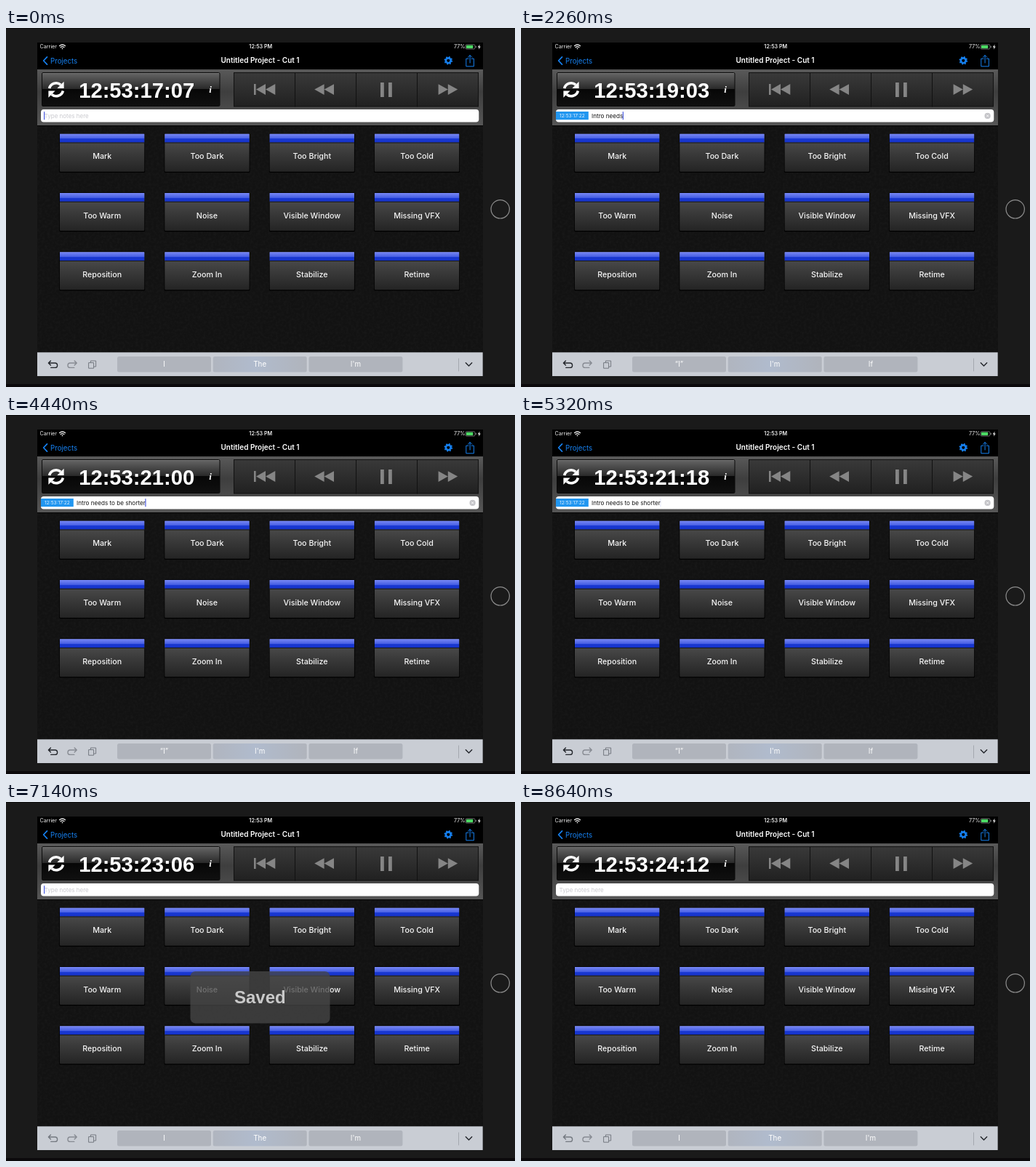
These frames come from a looping animation (700 by 494 pixels, 8660 ms). An HTML page:

```html
<!DOCTYPE html>
<html lang="en">
<head>
<meta charset="utf-8">
<title>Timecode notes</title>
<style>
html, body { margin: 0; width: 100%; height: 100%; overflow: hidden; background: #1a1a1a; }
svg { display: block; width: 700px; height: 494px; }
text { font-family: Inter, "Open Sans", sans-serif; white-space: pre; }
.mid { text-anchor: middle; }
.bold { font-family: "Liberation Sans", Arial, sans-serif; font-weight: 700; }
.label { font-size: 10.7px; font-weight: 500; fill: #f6f6f6; }
.status { font-size: 7.2px; fill: #f2f2f2; }
.note { font-size: 8.15px; fill: #151515; }
.word { font-size: 9.8px; fill: #fff; }
.line { fill: none; stroke-linecap: round; stroke-linejoin: round; }
</style>
</head>
<body>
<svg viewBox="0 0 700 494">
  <defs>
    <linearGradient id="panel" x2="0" y2="1">
      <stop stop-color="#5a5a5a"/><stop offset=".4" stop-color="#3e3e3e"/><stop offset="1" stop-color="#565656"/>
    </linearGradient>
    <linearGradient id="gloss" x2="0" y2="1">
      <stop stop-color="#666"/><stop offset=".48" stop-color="#2a2a2a"/>
      <stop offset=".5" stop-color="#070707"/><stop offset="1" stop-color="#101010"/>
    </linearGradient>
    <linearGradient id="deck" x2="0" y2="1">
      <stop stop-color="#393939"/><stop offset="1" stop-color="#212121"/>
    </linearGradient>
    <linearGradient id="body" x2="0" y2="1">
      <stop stop-color="#555"/><stop offset=".5" stop-color="#3b3b3b"/><stop offset="1" stop-color="#242424"/>
    </linearGradient>
    <linearGradient id="blue" x2="0" y2="1">
      <stop stop-color="#7888f4"/><stop offset=".55" stop-color="#465ee4"/>
      <stop offset=".57" stop-color="#1b3ad4"/><stop offset="1" stop-color="#1532c8"/>
    </linearGradient>
    <linearGradient id="midkey">
      <stop stop-color="#b0b5bf"/><stop offset=".45" stop-color="#b0bbcd"/><stop offset="1" stop-color="#b0b4bc"/>
    </linearGradient>
    <filter id="leather" x="0" y="0" width="1" height="1">
      <feTurbulence type="fractalNoise" baseFrequency=".28" numOctaves="2" seed="4"/>
      <feColorMatrix values="0 0 0 0 1  0 0 0 0 1  0 0 0 0 1  .35 0 0 0 -.11"/>
    </filter>
  </defs>

  <rect width="700" height="494" fill="#1a1a1a"/>
  <path d="M0 .5H700" stroke="#0c0c0c"/>
  <rect y="490" width="700" height="4" fill="#0b090b"/>
  <circle cx="679.7" cy="249.3" r="12.7" fill="none" stroke="#8d8d8d" stroke-width="1.2"/>
  <rect x="43" y="20" width="613" height="459" fill="#000"/>

  <!-- status bar -->
  <text class="status" x="46.5" y="28.4">Carrier</text>
  <g class="line" stroke="#f2f2f2" stroke-width="1.3">
    <path d="M73.6 24.6Q77.5 21.4 81.4 24.6M75.1 26.5Q77.5 24.6 79.9 26.5"/>
    <path d="M77.5 28.2v.2" stroke-width="1.6"/>
  </g>
  <text class="status mid" x="350.3" y="28.4" font-weight="600">12:53 PM</text>
  <text class="status" x="616" y="28.4">77%</text>
  <rect x="632" y="22.8" width="13" height="6.2" rx="1.6" fill="none" stroke="#999" stroke-width=".7"/>
  <rect x="633" y="23.8" width="9.3" height="4.2" rx=".7" fill="#4cd964"/>
  <path d="M646.2 24.8v2.2" stroke="#999"/>
  <path d="M651.6 22.4l-2.8 4h1.8l-.6 3.2 2.8-4.2H651z" fill="#f2f2f2"/>

  <!-- navigation bar -->
  <g class="line" stroke="#1680f0">
    <path d="M56.5 39.8L51.6 45l4.9 5.2" stroke-width="1.7"/>
    <path d="M636 42.2h-3.2v10.6h10.6V42.2h-3.2M638.1 48V37.6M635.4 40.2l2.7-2.7 2.7 2.7" stroke-width="1"/>
    <circle cx="608.3" cy="44.8" r="3.4" stroke-width="2.6"/>
    <circle cx="608.3" cy="44.8" r="5" stroke-width="1.6" stroke-dasharray="1.95 1.977" stroke-linecap="butt"/>
  </g>
  <text x="61" y="48.5" font-size="9.7" fill="#1680f0">Projects</text>
  <text class="mid" x="349.5" y="48.3" font-size="10" font-weight="600" fill="#fff">Untitled Project - Cut 1</text>

  <!-- transport panel -->
  <rect x="43" y="57" width="613" height="77" fill="url(#panel)"/>
  <rect x="49.5" y="61.5" width="244.5" height="46" rx="1.5" fill="url(#gloss)" stroke="#0a0a0a"/>
  <path d="M50.5 62.5H293" stroke="#808080" stroke-width=".7"/>
  <g id="sync" transform="translate(0 -.4)"></g>
  <text id="clock" class="bold" x="100.2" y="95.8" font-size="29.2" fill="#fff"></text>
  <text class="mid" x="281" y="89.2" style="font:italic 700 13px 'Liberation Serif',serif" fill="#fff">i</text>
  <g id="deckkeys"></g>
  <g fill="#858585">
    <rect x="341" y="77" width="2.6" height="15"/>
    <path d="M357 77v15l-13-7.5zM370.3 77v15l-13.3-7.5z"/>
    <path d="M437.6 77.3v14.6l-13.4-7.3zM451 77.3v14.6l-13.4-7.3z"/>
    <path d="M515 75h4.8v20H515zM526 75h4.8v20H526z"/>
    <path d="M594.6 77.3v14.6l13.2-7.3zM607.8 77.3v14.6l13.4-7.3z"/>
  </g>

  <!-- note field -->
  <rect x="48" y="112" width="602.3" height="17.6" rx="4" fill="#fff"/>
  <text id="hint" x="52.6" y="123.6" font-size="8" fill="#c9c9ce">Type notes here</text>
  <g id="entry">
    <rect x="48" y="115" width="44.8" height="11.2" fill="#2196f0"/>
    <text class="mid" x="70.4" y="123" font-size="6.6" fill="#e6f3ff">12:53:17:22</text>
    <text id="note" class="note" x="97" y="123.6"></text>
    <circle cx="641.6" cy="120.9" r="4.1" fill="#c4c4c8"/>
    <path d="M640.1 119.4l3 3m0-3l-3 3" stroke="#fff" stroke-width=".9"/>
  </g>
  <rect id="caret" y="115.2" width="1.2" height="11" fill="#4a5be0"/>

  <!-- marker buttons -->
  <rect x="43" y="134" width="613" height="312" fill="#121212"/>
  <rect x="43" y="134" width="613" height="312" filter="url(#leather)" opacity=".12"/>
  <path d="M43 134.5H656" stroke="#050505"/>
  <g id="markers"></g>

  <g id="toast">
    <rect x="253.5" y="233" width="192" height="71.5" rx="7" fill="#484848" fill-opacity=".76"/>
    <text class="bold mid" x="349.3" y="276.8" font-size="24" fill="#c9c9c9">Saved</text>
  </g>

  <!-- suggestion bar -->
  <rect x="43" y="446.3" width="612.7" height="32.7" fill="#c9cdd4"/>
  <g class="line" stroke="#22252a" stroke-width="1.4">
    <path id="undo" d="M61.4 458l-3 3 3 3M58.6 461h8.8a3.2 3.2 0 0 1 0 6.4h-5.6"/>
    <path d="M94.2 458l3 3-3 3M97 461h-8.8a3.2 3.2 0 0 0 0 6.4h5.6" stroke="#878b92"/>
    <path d="M114 460.6h6.6v7.6H114zM116.4 460.4v-2.4h7.2v8h-2.8" stroke="#747980" stroke-width="1"/>
    <path d="M632.3 460.8l4.2 4.2 4.2-4.2"/>
    <path d="M622.5 455v17" stroke="#a4a8af" stroke-width="1"/>
  </g>
  <g id="words"></g>
</svg>
<script>
const LOOP = 8660, FPS = 24, SAVED = 5450, TOAST_END = 7850, BLINK = 1200;
const NOTE = 'Intro needs to be shorter';
const START_WORDS = ['I', 'The', "I'm"], TYPED_WORDS = ['“I”', "I'm", 'If'];
const CLOCK = [[0, 0], [1400, 26], [3100, 62], [4440, 89], [6100, 122], [7140, 143], [8640, 173]];
const TYPING = [[600, 0], [800, 1], [1400, 4], [3060, 18], [4250, 25]];
const $ = id => document.getElementById(id);
const clamp = v => Math.max(0, Math.min(1, v));
const pad = n => String(n).padStart(2, '0');

function along(points, t) {
  let value = points[0][1];
  for (let i = 1; i < points.length; i++) {
    const [t0, v0] = points[i - 1], [t1, v1] = points[i];
    if (t >= t0) value = v0 + (v1 - v0) * clamp((t - t0) / (t1 - t0));
  }
  return value;
}

const arrow = `<path d="M59.6 83.5A9.6 9.6 0 0 1 75.2 78.6" fill="none" stroke="#fff" stroke-width="3.6"/>
  <path d="M79.6 74.2v9.2h-9.2z" fill="#fff"/>`;
$('sync').innerHTML = arrow + `<g transform="rotate(180 69 85.2)">${arrow}</g>`;

$('deckkeys').innerHTML = [0, 1, 2, 3].map(i =>
  `<rect x="${313.5 + i * 84}" y="61.5" width="84" height="46.5" fill="url(#deck)" stroke="#111"/>`).join('');

const names = ['Mark', 'Too Dark', 'Too Bright', 'Too Cold', 'Too Warm', 'Noise',
  'Visible Window', 'Missing VFX', 'Reposition', 'Zoom In', 'Stabilize', 'Retime'];
$('markers').innerHTML = names.map((name, i) => {
  const x = 74 + (i % 4) * 144.3, y = 145.7 + Math.floor(i / 4) * 81.3;
  return `<g transform="translate(${x} ${y})">
    <rect x="-.7" y="-.7" width="117.8" height="54" rx="1.5" fill="#000"/>
    <rect width="116.3" height="52" rx="1" fill="url(#body)"/>
    <rect width="116.3" height="11.8" fill="url(#blue)"/>
    <path d="M0 12.3H116.3" stroke="#161616"/>
    <text class="label mid" x="58.2" y="34.6">${name}</text></g>`;
}).join('');

$('words').innerHTML = [0, 1, 2].map(i => {
  const x = 153 + i * 131.7;
  return `<rect x="${x}" y="452" width="129" height="21.6" rx="2.5" fill="${i == 1 ? 'url(#midkey)' : '#b0b4bc'}"/>
    <text class="word mid" x="${x + 64.5}" y="466.4"></text>`;
}).join('');
const wordTexts = document.querySelectorAll('.word');

function setText(el, text) {
  if (el.textContent !== text) el.textContent = text;
}

function caretAlpha(t) {
  if (t >= 800 && t < 4250) return 1;
  const since = t < 800 ? t : t < SAVED ? t - 4250 : t - SAVED;
  const phase = since % BLINK;
  return phase < 1000 ? clamp((740 - phase) / 150) : clamp((phase - 1050) / 150);
}

function draw() {
  const t = performance.now() % LOOP;
  const frames = 17 * FPS + 7 + Math.floor(along(CLOCK, t) + .5);
  setText($('clock'), `12:53:${pad(Math.floor(frames / FPS))}:${pad(frames % FPS)}`);

  const count = t < SAVED ? Math.floor(along(TYPING, t)) : 0;
  setText($('note'), NOTE.slice(0, count));
  $('entry').style.display = count ? '' : 'none';
  $('hint').style.display = count ? 'none' : '';
  $('caret').setAttribute('x', count ? 97 + $('note').getComputedTextLength() - .5 : 52);
  $('caret').style.opacity = caretAlpha(t);

  const words = count ? TYPED_WORDS : START_WORDS;
  wordTexts.forEach((el, i) => setText(el, words[i]));
  $('undo').style.stroke = t < SAVED ? '#22252a' : '#747980';
  $('toast').style.opacity = Math.min(clamp((t - SAVED) / 200), clamp((TOAST_END - t) / 300));
  requestAnimationFrame(draw);
}
draw();
</script>
</body>
</html>
```
